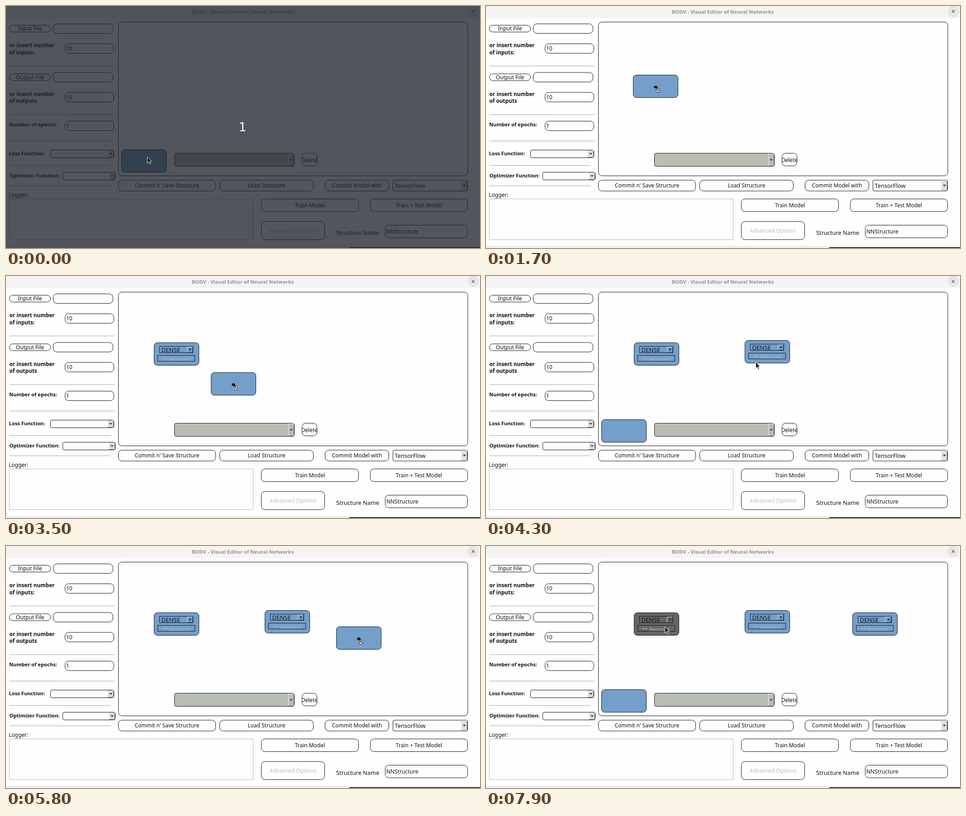
An HTML page for the animation above (8000 ms loop, 1048 px wide and 535 px high).

```html
<!DOCTYPE html>
<html lang="en">
<head>
<meta charset="utf-8">
<title>Visual Editor</title>
<style>
html, body { margin: 0; width: 100%; height: 100%; overflow: hidden; background: #fefefe; }
svg { display: block; width: 1048px; height: 535px; }
text { font: 12px "Noto Sans", sans-serif; fill: #101010; white-space: pre; }
.mid { text-anchor: middle; }
.big { font-size: 12.8px; }
.bold { font-weight: 700; font-size: 11.75px; }
.small { font-weight: 700; font-size: 11.2px; }
.title { font-weight: 700; font-size: 11.25px; fill: #929494; }
.off { fill: #bebebe; }
.box { fill: #fefefe; stroke: #111; }
.rule { stroke: #a2a2a2; }
.blue { fill: #749fca; stroke: #10151c; }
.grey .blue { fill: #666; }
.inner { fill: none; stroke: #10151c; }
.dense { font-size: 13.2px; }
.hint { font-size: 11.5px; fill: #b2b8be; }
.count { font: 26px "DejaVu Sans", sans-serif; fill: #fff; }
</style>
</head>
<body>
<svg viewBox="0 0 1048 535">
  <defs>
    <clipPath id="area"><rect x="249" y="36" width="772" height="340" rx="7"/></clipPath>
    <clipPath id="delClip"><rect x="655" y="326" width="32.5" height="28"/></clipPath>
    <g id="node">
      <rect class="blue" x=".5" y=".5" width="99" height="50" rx="7"/>
      <rect class="inner" x="12.5" y="8.5" width="74" height="14"/>
      <path d="M73.5 22V9.5H86" fill="none" stroke="#cfd9e4"/>
      <path d="M74 21.5H85.5V10" fill="none" stroke="#4a5560"/>
      <path d="M76.5 14H83.5L80 18Z" fill="#26303a"/>
      <rect class="inner" x="8.5" y="28.5" width="82" height="13"/>
      <text class="dense" x="16.5" y="21">DENSE</text>
      <text class="hint mid" x="49" y="41">** Neurons</text>
    </g>
  </defs>

  <rect width="1048" height="535" fill="#fefefe"/>
  <rect width="1048" height="27" fill="#f5f4f2"/>
  <text class="title mid" x="523.5" y="16.5">BODV - Visual Editor of Neural Networks</text>
  <circle cx="1033" cy="12" r="11" fill="#ebe9e7" stroke="#d2cfcc"/>
  <path d="M1030 9L1036 15M1036 9L1030 15" stroke="#555" stroke-width="1.3"/>
  <path d="M0 532.5H759" stroke="#c6c6c6"/>
  <path d="M759 534H1048" stroke="#2e2e32" stroke-width="2"/>

  <g id="form"></g>

  <g clip-path="url(#area)">
    <g id="nodes"></g>
    <rect id="block" class="blue" x=".5" y=".5" width="99" height="50" rx="7"/>
  </g>

  <rect x="372.5" y="325.5" width="265" height="29" rx="4" fill="#b8beb3" stroke="#111"/>
  <path d="M624.5 354V326.5H636" fill="none" stroke="#eceee9"/>
  <path d="M636.5 327V353.5H625" fill="none" stroke="#7c8177"/>
  <path d="M627 338.5H634L630.5 342.5Z" fill="#444"/>
  <rect class="box" x="654.5" y="325.5" width="33" height="28" rx="8"/>
  <text class="mid" x="671" y="344.5" clip-path="url(#delClip)">Delete</text>

  <g id="shade">
    <rect width="1048" height="535" fill="rgb(30,36,44)" fill-opacity=".77"/>
    <text class="count mid" x="523" y="277">1</text>
  </g>

  <path id="arrow" d="M.5 .5V14L3.6 11.2L6 16.5L8.2 15.5L5.9 10.4H10Z" fill="#111" stroke="#fff" stroke-width=".9"/>
  <g id="hand">
    <path d="M-4 -1L-3 -3L0 -4L3 -3L4 0V2H-2L-4 0Z" fill="#111"/>
    <rect x="1.5" y="2.5" width="7" height="8" fill="#fff" stroke="#111" stroke-width=".8"/>
    <path d="M3 4H6.5L5.4 5.2L7.6 8L6.6 8.8L4.4 6.2L3 7.5Z" fill="#111"/>
  </g>
</svg>

<script>
const $ = id => document.getElementById(id);

// Form parts
const text = (s, x, y, cls = '') => `<text class="${cls}" x="${x}" y="${y}">${s}</text>`;
const box = (x, y, w, h, r = 8) =>
  `<rect class="box" x="${x + .5}" y="${y + .5}" width="${w - 1}" height="${h - 1}" rx="${r}"/>`;
const rule = (y, end = 240) => `<path class="rule" d="M8 ${y + .5}H${end}"/>`;
const button = (s, x, y, w, h, cls = '') =>
  box(x, y, w, h) + text(s, x + w / 2, y + h / 2 + 4.3, 'mid ' + cls);
const field = (s, x, y, w, h = 22) => box(x, y, w, h) + text(s, x + 3, y + h / 2 + 4.3);
const combo = (s, x, y, w, h) => {
  const right = x + w - 1, cx = right - 6.5, cy = y + h / 2;
  return box(x, y, w, h, 3) + text(s, x + 4.5, cy + 4.5, 'big')
    + `<path d="M${right - 13} ${y + 1}H${right}V${y + h - 1}H${right - 13}Z" fill="#dededc"/>`
    + `<path d="M${right - .5} ${y + 2}V${y + h - 1.5}H${right - 13}" fill="none" stroke="#777"/>`
    + `<path d="M${cx - 3.5} ${cy - 2}H${cx + 3.5}L${cx} ${cy + 2}Z" fill="#444"/>`;
};

const group = (name, plural, y) =>
  button(name + ' File', 7, y + 3, 92, 16) + field('', 104, y, 133)
  + text('or insert number', 7.5, y + 52, 'bold') + text(plural, 7.5, y + 67.5, 'bold')
  + field('10', 130, y + 44, 109) + rule(y + 93);

$('form').innerHTML =
  group('Input', 'of inputs:', 39) + group('Output', 'of outputs', 146.5)
  + text('Number of epochs:', 7, 265.5, 'small') + field('1', 130, 254, 109) + rule(298)
  + text('Loss Function:', 6.5, 329.5, 'small') + combo('', 98, 318, 141, 18) + rule(352, 232)
  + text('Optimizer Function:', 7.5, 378.5, 'small') + combo('', 125, 367, 117, 18) + rule(397, 232)
  + text('Logger:', 6, 421.5)
  + '<rect x="7.5" y="426.5" width="539" height="90" fill="none" stroke="#b6b6b6"/>'
  + box(248, 35, 773.5, 341)
  + button("Commit n' Save Structure", 248, 384.5, 216, 25)
  + button('Load Structure', 472, 384.5, 208, 25)
  + button('Commit Model with', 705, 384.5, 142, 25)
  + combo('TensorFlow', 855, 384.5, 166, 25)
  + button('Train Model', 564, 426, 216, 29)
  + button('Train + Test Model', 805, 426, 216, 29)
  + button('Advanced Options', 564, 476, 141, 41, 'off')
  + text('Structure Name', 730, 505.5, 'big') + field('NNStructure', 838, 484, 183, 29);

// Each step drags a block to its place, then moves the pointer on; keys are time, x, y
const steps = [
  { block: [[900, 279, 280], [1800, 327, 147]],
    arrow: [[1900, 377, 172], [2500, 300, 364]] },
  { block: [[2800, 255, 331], [4000, 572, 142]],
    arrow: [[4100, 622, 167], [4300, 596, 190], [4700, 305, 345]] },
  { block: [[5000, 255, 326], [5800, 730, 178], [6700, 810, 147]],
    arrow: [[6900, 860, 172], [7500, 432, 180], [7700, 432, 180], [7800, 395, 178]] }
];
const home = [255, 317], rest = [312, 333];
for (const s of steps) {
  s.start = s.block[0][0];
  s.end = s.block.at(-1)[0] + 100;
}

$('nodes').innerHTML = steps.map((s, i) => {
  const [, x, y] = s.block.at(-1);
  return `<g id="n${i}" transform="translate(${x} ${y})"></g>`;
}).join('');
const shape = $('node');
shape.removeAttribute('id');
steps.forEach((s, i) => $('n' + i).append(shape.cloneNode(true)));

function at(keys, t) {
  const i = keys.findIndex(k => k[0] > t);
  if (i < 1) return keys.at(i).slice(1);
  const a = keys[i - 1], b = keys[i];
  const u = (t - a[0]) / (b[0] - a[0]), p = u * u * (3 - 2 * u);
  return [1, 2].map(k => Math.round(a[k] + (b[k] - a[k]) * p));
}
const show = (id, on) => { $(id).style.display = on ? '' : 'none'; };
const move = (id, [x, y]) => $(id).setAttribute('transform', `translate(${x} ${y})`);

function draw(t) {
  const step = steps.findLast(s => t >= s.start);
  const dragging = step && t < step.end;
  const pos = dragging ? at(step.block, t) : home;
  move('block', pos);
  move('hand', [pos[0] + 50, pos[1] + 28]);
  move('arrow', step ? at(step.arrow, t) : rest);
  show('hand', dragging);
  show('arrow', !dragging);
  steps.forEach((s, i) => show('n' + i, t >= s.end));
  $('n0').classList.toggle('grey', t >= 7900);
  show('shade', t < 100);
}

const start = performance.now();
function tick() {
  draw(Math.floor((performance.now() - start) % 8000 / 100) * 100);
  requestAnimationFrame(tick);
}
tick();
</script>
</body>
</html>
```
